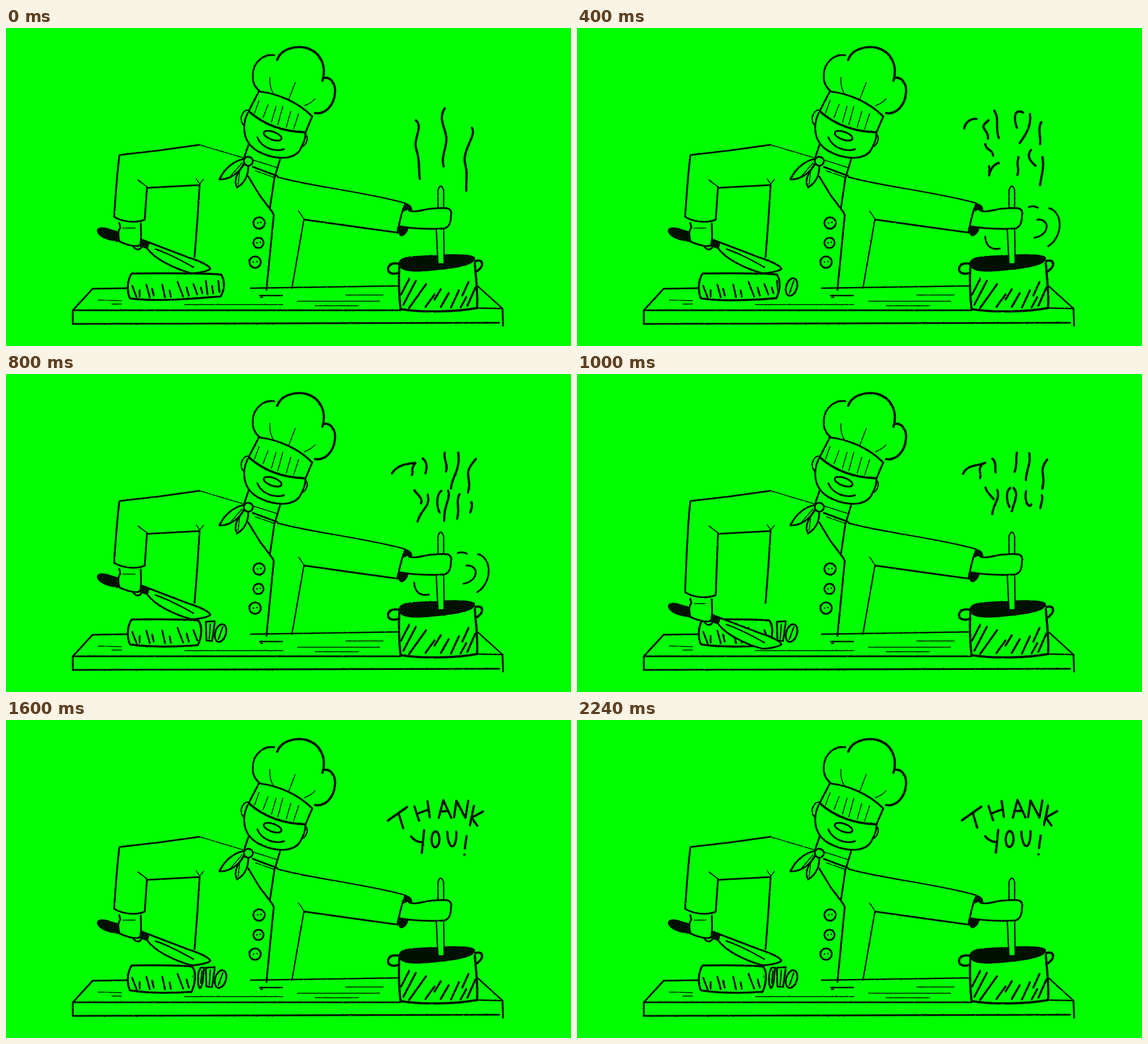
Animation, 998 px wide and 561 px high, one loop 2400 ms. Source, as an HTML page:

```html
<!DOCTYPE html>
<html lang="en">
<head>
<meta charset="utf-8">
<title>Chef</title>
<style>
html, body { margin: 0; width: 100%; height: 100%; overflow: hidden; background: #0f0; }
svg { display: block; width: 100%; height: 100%; }
.ink { fill: none; stroke: #001200; stroke-width: 3.2; stroke-linecap: round; stroke-linejoin: round; }
.bold { stroke-width: 4; }
.light { stroke-width: 2.4; }
.thin { stroke-width: 1.6; }
.solid { fill: #001000; }
.paper { fill: #0f0; }
</style>
</head>
<body>
<svg viewBox="0 0 998 561" preserveAspectRatio="none">
  <defs>
    <filter id="rough" filterUnits="userSpaceOnUse" x="0" y="0" width="998" height="561" color-interpolation-filters="sRGB">
      <feTurbulence type="fractalNoise" baseFrequency=".35" numOctaves="2" seed="4" result="grain"/>
      <feDisplacementMap in="SourceGraphic" in2="grain" scale="2" xChannelSelector="R" yChannelSelector="G"/>
    </filter>
    <clipPath id="cut"><rect id="cutBox" x="210" y="425" height="65"/></clipPath>
  </defs>
  <rect width="998" height="561" fill="#0f0"/>
  <g class="ink" filter="url(#rough)">
    <g id="hat">
      <path d="M474 48C455 45 437 60 436 82C435 95 440 105 448 111"/>
      <path class="bold" d="M479 56C485 38 510 30 530 35C555 42 567 66 559 93M546 150C563 153 579 138 581 115C583 99 574 86 562 88"/>
      <path d="M448 112C480 116 515 130 541 156L529 184M447 111L429 146"/>
      <path class="bold" d="M429 147C455 170 490 183 529 184"/>
      <path class="thin" d="M466 87Q465 105 473 117M511 96L499 127M546 125Q537 134 527 137M447 128L439 150M463 135L454 158M477 138L469 166M489 138L480 171M503 147L495 175M517 151L508 178"/>
    </g>
    <g id="head">
      <path d="M427 150C416 172 417 205 450 220C480 234 512 232 521 212C526 203 529 195 529 186"/>
      <path class="light" d="M428 145C417 143 410 165 421 172M528 188C536 190 531 207 523 209"/>
      <ellipse cx="471" cy="190" rx="16.5" ry="7" transform="rotate(20 471 190)"/>
      <path d="M444 193C452 212 475 219 491 214"/>
      <path d="M428 207L421 228M484 232L474 265L466 319M436 245L479 261"/>
      <path class="thin" d="M437 233L481 247M441 252L475 264"/>
    </g>
    <g id="scarf">
      <path d="M420 231C400 235 385 250 377 267C395 268 413 255 421 238"/>
      <path d="M421 240C408 255 402 270 408 281C420 275 428 262 428 244"/>
      <path class="thin" d="M417 238L397 261M413 250L410 276"/>
      <circle cx="428" cy="235" r="8"/>
    </g>
    <g id="body">
      <path d="M201 224L270 216L342 206"/>
      <path class="thin" d="M342 206L419 229M336 266L342 275L349 267M233 268L250 281M517 323L527 338"/>
      <path d="M428 262L448 295L470 324M470 324L473 330L460 462"/>
      <path d="M249 282L342 277L338 340L333 404"/>
      <path class="light" d="M480 263C540 280 640 290 705 309M526 339L505 459"/>
      <path d="M527 338L692 361"/>
      <g id="buttons"></g>
    </g>
    <g id="table">
      <path d="M214 459L153 460L119 497M118 498H697M118 498V522L871 520M877 495L878 525"/>
      <path class="light" d="M432 459L692 455M834 456L877 495M832 494L877 495"/>
      <path class="thin" d="M163 480L204 481M187 487H204M315 488H489M515 482H660M546 490H623M600 471H666"/>
      <path class="light" d="M448 472H488M450 475H453"/>
    </g>
    <g id="pot">
      <path class="solid" d="M695 416C695 403 720 404 760 402C800 399 825 401 827 406C828 418 790 424 735 428C710 429 696 426 695 416Z"/>
      <path class="bold" d="M695 415C693 450 695 480 697 496C740 503 800 500 832 494C834 470 830 440 828 415"/>
      <path class="bold" d="M695 416C680 413 672 420 676 430C682 435 688 434 693 432M829 411C844 407 845 420 832 429"/>
      <path style="stroke-width:3.6" d="M712 443L698 470M724 446L702 488M742 452L712 494M757 470L741 492M768 461L757 479M782 468L768 492M800 463L786 493M817 448L806 472M813 475L803 493M829 458L815 490"/>
    </g>
    <g id="stirrer">
      <path class="paper light" d="M763 318V286Q768 272 773 286V318Z"/>
      <path class="paper light" d="M760 354L763 416H774L773 354"/>
      <path class="paper" d="M712 322C725 327 740 318 760 318C777 317 789 316 786 330C786 345 782 354 770 354C745 355 720 354 697 350"/>
      <path d="M705 311C698 325 695 345 691 361"/>
      <path class="solid" d="M705 310Q716 313 716 320Q708 318 703 322ZM695 349Q700 355 710 352Q706 365 698 366Q692 362 695 349Z"/>
    </g>
    <g id="roll">
      <path id="rollEdge" style="stroke-width:3.6"/>
      <path clip-path="url(#cut)" d="M223 455L231 476M236 462V474M248 453L254 475M258 460L261 472M276 453L281 475M289 463L291 474M303 448L313 474M319 458L323 472M331 452L338 470M344 458L347 468M353 446L356 470M364 455L366 468M375 446L377 466"/>
    </g>
    <g>
      <g id="slice0"><ellipse cx="379" cy="457" rx="9.5" ry="16" transform="rotate(17 379 457)"/><path class="light" d="M383 446L375 468"/></g>
      <g id="slice1"><path d="M353 437L369 436L364 471L354 470Z"/><path class="light" d="M361 441L359 467"/></g>
      <g id="slice2"><path d="M344 437C338 445 338 465 342 473C349 471 348 445 350 437Z"/><path class="light" d="M346 443L344 464"/></g>
    </g>
    <path id="sleeve"/>
    <g id="knife">
      <path class="solid" d="M162 358C163 351 172 353 180 355L200 361V376C185 374 165 370 162 358Z"/>
      <path class="paper" d="M252 378L320 404C345 412 360 420 361 425C355 430 332 434 325 432C300 425 262 408 249 388Z"/>
      <path class="light" d="M264 390C285 397 310 410 331 422"/>
      <path class="solid" d="M239 373L252 378L249 388L237 384Z"/>
      <path class="paper" d="M200 344L202 352C197 358 198 370 201 377C215 383 230 387 237 383C240 370 238 355 238 345"/>
      <path d="M225 386Q233 395 239 387"/>
      <path class="thin" d="M207 353H228"/>
    </g>
    <path id="swirl" d="M798 316Q806 313 814 317M834 318C860 325 858 370 832 385M813 338C836 336 836 365 808 370M721 368C722 385 732 392 747 389"/>
    <path id="steam" class="bold"/>
    <path id="extra" class="bold"/>
    <path id="words" class="bold" aria-label="Thank you!"/>
  </g>
</svg>
<script>
const $ = id => document.getElementById(id);
const show = (id, on) => $(id).style.display = on ? "" : "none";

const LOOP = 2400;
const STARTS = [0, 200, 400, 600, 800, 1000, 1200, 1400, 1600, 1840, 2040, 2240];
const ROLL_ENDS = [385, 358, 345, 334];
const CHOP = 52;

const RISING = "M724 163C738 175 718 195 725 215C732 235 728 250 731 266" +
  "M775 142C762 160 778 180 778 195C778 215 768 225 773 244" +
  "M823 176C832 190 805 215 811 240C816 255 812 272 813 287";

// Matching strokes, so neighbouring shapes can be blended
const WISPS = [
  "M684 177C687 163 698 160 706 160M727 163C706 178 728 178 726 195M737 146C747 160 738 175 745 194" +
  "M788 149C776 143 769 152 777 176M800 152C803 170 795 185 782 203M820 166C813 180 820 190 818 205" +
  "M721 205C724 218 733 212 735 225M745 238C735 241 730 250 728 260M780 228C775 240 782 248 778 259" +
  "M802 215C794 225 800 235 810 243M822 228C826 245 820 260 818 277M728 244C728 250 729 255 728 259",
  "M682 175C692 158 715 158 723 157M723 157C713 170 721 172 717 178M736 149C744 155 744 165 741 175" +
  "M775 139C772 150 782 160 777 172M799 139C803 170 787 182 786 202M830 150C803 180 825 180 816 209" +
  "M721 205C727 213 737 220 733 228M745 213C750 236 734 236 727 260M769 206C758 215 762 238 766 244" +
  "M781 206C786 222 773 229 774 259M801 212C794 225 802 238 797 255M822 226C824 232 823 238 820 244",
  "M682 177C688 158 705 168 719 156M706 164C702 172 709 180 707 189M732 150C738 157 732 163 738 172" +
  "M779 139C777 150 774 160 769 173M799 141C801 152 798 160 800 172M831 152C825 165 833 175 828 195" +
  "M722 196C722 207 728 212 738 213M740 196C745 210 736 222 740 234M761 196C753 203 759 218 762 225" +
  "M761 196C776 200 772 222 762 225M785 202C786 234 798 236 808 205M820 202C824 212 815 220 817 229"
];
const LETTER_ENDS = "M735 162L750 160M749 148Q755 162 752 178M779 139Q782 155 788 173M772 163L786 161" +
  "M799 141Q808 160 817 168Q819 155 821 140M845 163Q835 163 829 170L837 184M757 212L770 209M815 241h.5";
const LETTERS = "M680 177L714 153M699 164L707 190M727 152L735 177M732 165L750 158M750 143L754 171" +
  "M770 172L778 141L792 172M772 161L786 160M797 171L801 142L817 172L822 142M832 151L825 185" +
  "M848 161L828 172L838 186M721 205Q728 214 738 215M744 194L740 234" +
  "M764 196C755 198 755 224 764 224C774 222 773 196 764 196M785 197C786 230 802 232 801 196" +
  "M819 204L816 226M815 237h.5";

function blend(a, b) {
  const goal = b.match(/[\d.]+/g);
  let i = 0;
  return a.replace(/[\d.]+/g, n => (+n + +goal[i++]) / 2);
}

function rollPath(end) {
  const low = 480 - Math.max(0, end - 330) * 0.12;
  return `M222 433C214 445 213 465 219 477Q265 484 ${end - 6} ${low}` +
    `C${end} 465 ${end + 3} 446 ${end - 5} 435Q${end - 30} 432 222 433`;
}

function sleevePath(dy) {
  return `M200 226Q195 270 191 ${333 + dy}C205 ${342 + dy} 230 ${345 + dy} 245 ${338 + dy}L249 281`;
}

function steamAt(step) {
  if (step < 2) return RISING;
  if (step > 6) return "";
  const i = (step - 2) >> 1;
  return step % 2 ? blend(WISPS[i], WISPS[i + 1]) : WISPS[i];
}

function draw(step) {
  const chopping = step < 6 && step % 2 === 1;
  const dy = chopping ? CHOP : 0;
  const cuts = Math.min(step >> 1, 3);
  const end = ROLL_ENDS[cuts];

  $("knife").setAttribute("transform", `translate(0 ${dy})`);
  $("sleeve").setAttribute("d", sleevePath(dy));
  $("rollEdge").setAttribute("d", rollPath(end));
  $("cutBox").setAttribute("width", end - 213);
  for (let i = 0; i < 3; i++) show("slice" + i, i < cuts);

  show("swirl", step >= 2 && step <= 6 && !chopping);
  $("steam").setAttribute("d", steamAt(step));
  $("steam").setAttribute("stroke-dasharray", step === 1 ? "26 13" : "none");
  $("extra").setAttribute("d", step === 6 ? LETTER_ENDS : "");
  $("words").setAttribute("d", step > 6 ? LETTERS : "");
  $("words").setAttribute("transform", step % 2 || step === LAST ? "" : "translate(-5.5 .5)");
}

const LAST = STARTS.length - 1;

$("buttons").innerHTML = [[447, 344, 10], [446, 379, 9], [440, 413, 10]].map(([x, y, r]) =>
  `<circle cx="${x}" cy="${y}" r="${r}"/><path class="light" d="M${x - 3} ${y}h.5M${x + 3} ${y - 1}h.5"/>`
).join("");

let current = -1;
function tick() {
  const t = performance.now() % LOOP;
  const step = STARTS.filter(s => s <= t).length - 1;
  if (step !== current) draw(current = step);
  requestAnimationFrame(tick);
}
tick();
</script>
</body>
</html>
```
